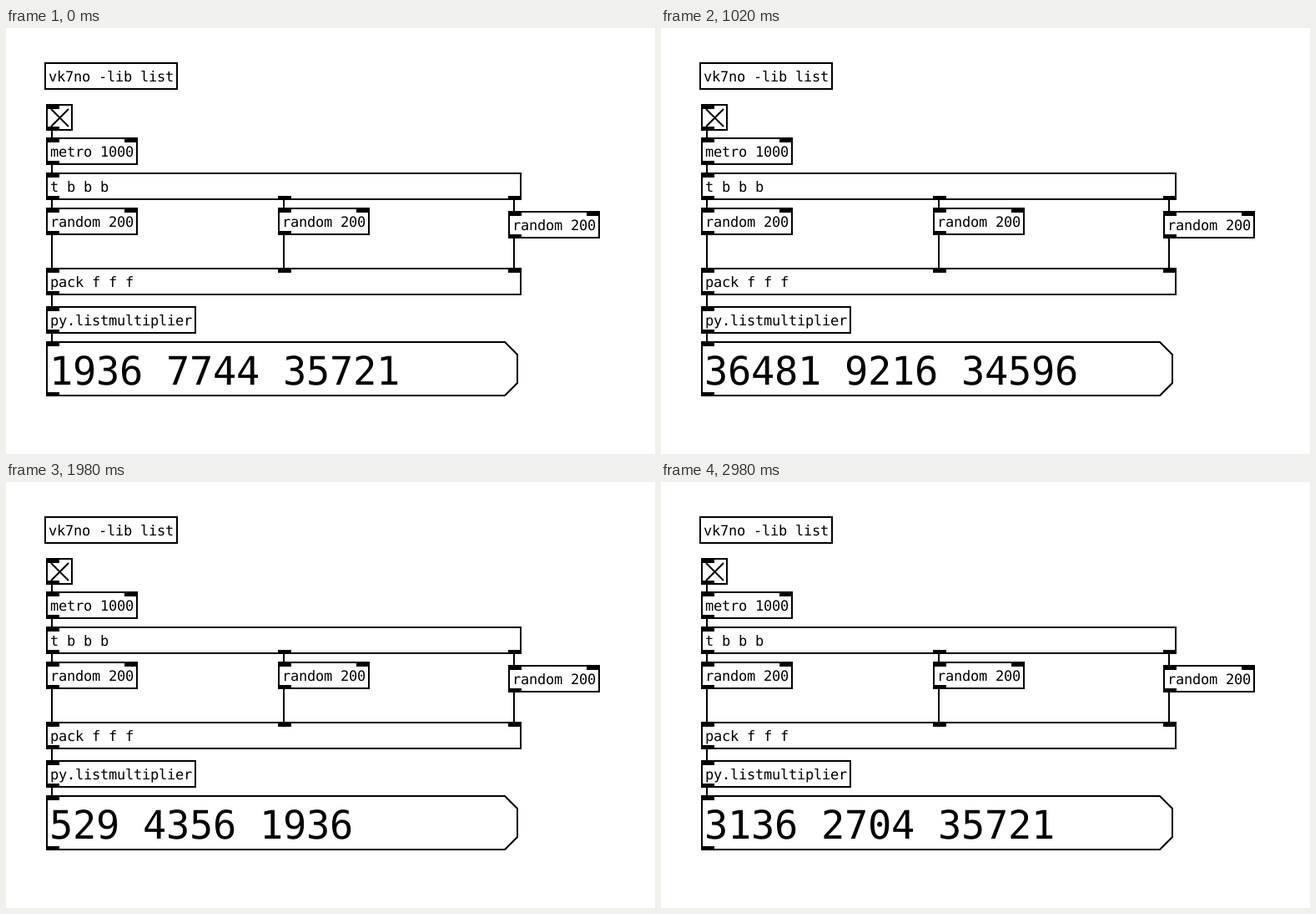
An HTML page for the animation above (3730 ms loop, 778 by 510 pixels).

```html
<!DOCTYPE html>
<html lang="en">
<head>
<meta charset="utf-8">
<title>Patch</title>
<style>
  html, body { margin: 0; width: 100%; height: 100%; overflow: hidden; background: #fff; }
  svg { display: block; width: 778px; height: 510px; }
  path { fill: none; stroke: #000; stroke-width: 2; }
  text {
    font: 17px "DejaVu Sans Mono", monospace;
    letter-spacing: -0.234px;
    text-rendering: geometricPrecision;
    white-space: pre;
  }
  .result {
    font-size: 47px;
    letter-spacing: -0.295px;
    visibility: hidden;
    animation: 3730ms step-end infinite;
  }
  .r1 { animation-name: first; }
  .r2 { animation-name: second; }
  .r3 { animation-name: third; }
  .r4 { animation-name: fourth; }
  /* switches at 1020, 1980 and 2980 ms */
  @keyframes first { 0% { visibility: visible } 27.3458%, 100% { visibility: hidden } }
  @keyframes second { 0% { visibility: hidden } 27.3458% { visibility: visible } 53.0831%, 100% { visibility: hidden } }
  @keyframes third { 0% { visibility: hidden } 53.0831% { visibility: visible } 79.8928%, 100% { visibility: hidden } }
  @keyframes fourth { 0% { visibility: hidden } 79.8928%, 100% { visibility: visible } }
</style>
</head>
<body>
<svg viewBox="0 0 778 510">
  <path d="M55 122V132M55 163V174M55 205V216M55 247V288M55 319V334M55 365V376M333 205V216M333 247V288M609 205V220M609 251V288"/>
  <path d="M54 97L75 118M75 97L54 118"/>
  <path d="M49 376H598L613 391V425L598 440H49Z"/>
  <g id="patch"></g>
  <text class="result r1" x="52" y="427">1936 7744 35721</text>
  <text class="result r2" x="52" y="427">36481 9216 34596</text>
  <text class="result r3" x="52" y="427">529 4356 1936</text>
  <text class="result r4" x="52" y="427">3136 2704 35721</text>
</svg>
<script>
  const patch = document.getElementById("patch");

  function add(tag, attrs, label = "") {
    const node = document.createElementNS("http://www.w3.org/2000/svg", tag);
    for (const key in attrs) node.setAttribute(key, attrs[key]);
    node.textContent = label;
    patch.append(node);
  }

  // Inlets and outlets are given as x offsets from the left edge.
  function box(x, y, width, label, inlets = [0], outlets = [0], height = 31, frame = true) {
    if (frame) add("path", { d: `M${x} ${y}h${width}v${height}h${-width}z` });
    const port = (dx, top) => add("rect", { x: x + dx - 1, y: top, width: 16, height: 5 });
    inlets.forEach(dx => port(dx, y));
    outlets.forEach(dx => port(dx, y + height - 4));
    if (label) add("text", { x: x + 4, y: y + 22 }, label);
  }

  box(47, 42, 158, "vk7no -lib list", [], []);
  box(49, 92, 30, "", [0], [0], 30);
  box(49, 132, 108, "metro 1000", [0, 94]);
  box(49, 174, 568, "t b b b", [0], [0, 278, 554]);
  box(49, 216, 108, "random 200", [0, 94]);
  box(327, 216, 108, "random 200", [0, 94]);
  box(603, 220, 108, "random 200", [0, 94]);
  box(49, 288, 568, "pack f f f", [0, 278, 554]);
  box(49, 334, 178, "py.listmultiplier");
  box(49, 376, 564, "", [0], [0], 64, false);
</script>
</body>
</html>
```
